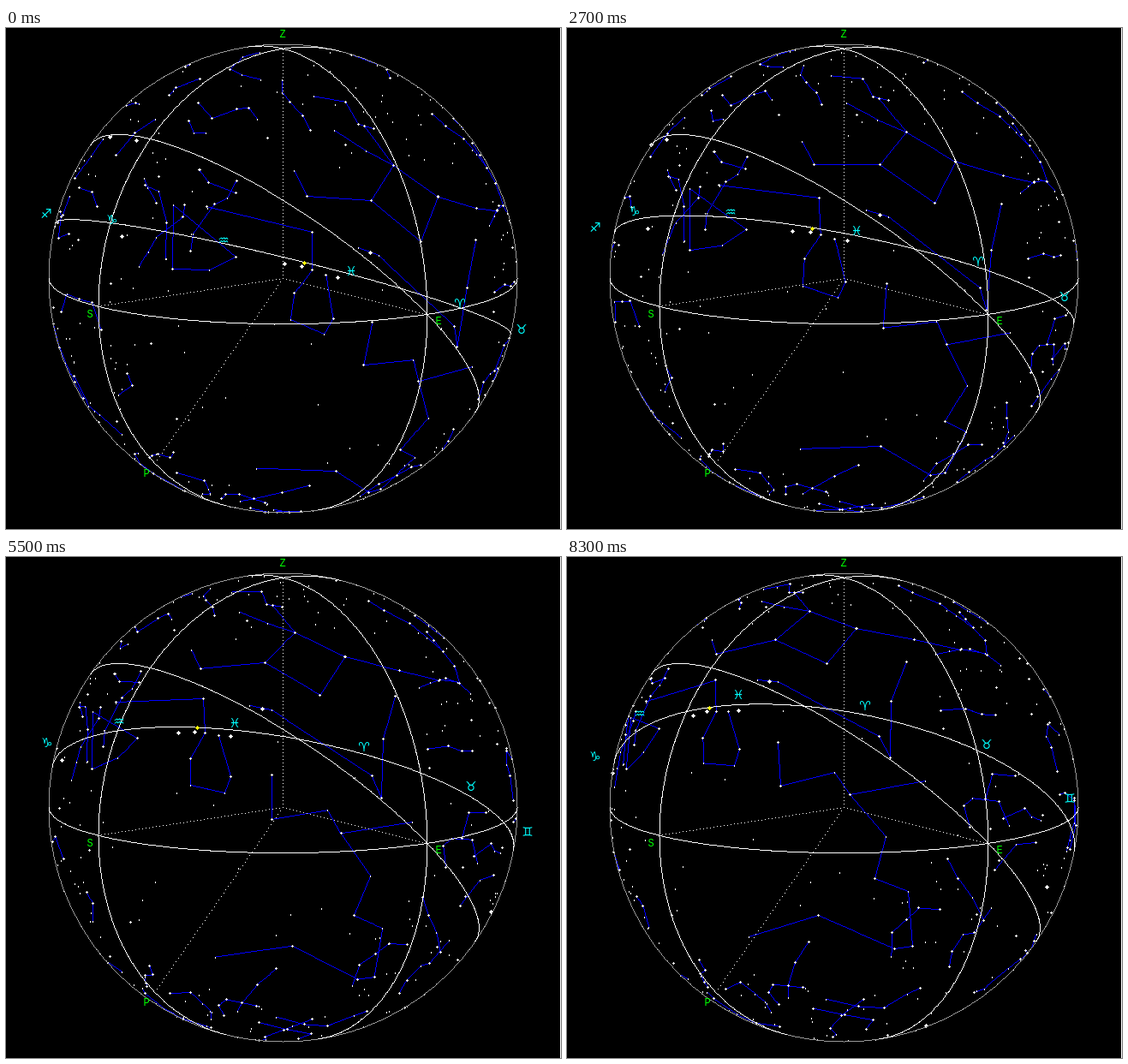
Write an HTML page with a canvas that moves like this. It is 648 by 585 pixels and loops after 8.4 s.

```html
<!DOCTYPE html>
<html lang="en">
<head>
<meta charset="utf-8">
<title>Turning celestial sphere</title>
<style>
html, body { margin: 0; width: 100%; height: 100%; overflow: hidden; background: #000; }
canvas { display: block; }
</style>
</head>
<body>
<canvas id="sky" width="648" height="585"></canvas>
<script>
const ctx = document.getElementById('sky').getContext('2d');
const CX = 323, CY = 292, R = 273.5, RAD = Math.PI / 180;
const STEPS = 84, STEP_MS = 100;
const sin = d => Math.sin(d * RAD), cos = d => Math.cos(d * RAD);
const mix = (u, a, v, b) => u.map((c, i) => c * a + v[i] * b);
const dot = (u, v) => u[0] * v[0] + u[1] * v[1] + u[2] * v[2];

// Vectors are [right, down, towards the viewer].
const TILT = 11.2, AZIMUTH = 52, LATITUDE = 46, OBLIQUITY = 23.5;
const level = (right, near) => [right, near * sin(TILT), near * cos(TILT)];
const south = level(-sin(AZIMUTH), cos(AZIMUTH));
const east = level(cos(AZIMUTH), sin(AZIMUTH));
const zenith = [0, -cos(TILT), sin(TILT)];
const culmination = mix(south, sin(LATITUDE), zenith, cos(LATITUDE));
const north = mix(south, -cos(LATITUDE), zenith, sin(LATITUDE));
const southPole = north.map(c => -c);

const siderealAngle = step => 10.4 + 0.5875 * step;
const screen = (v, scale = 1) => [CX + v[0] * R * scale, CY + v[1] * R * scale];

function direction({ ra, dec }, step) {
  const hour = siderealAngle(step) - ra;
  return mix(mix(east, cos(hour), culmination, sin(hour)), cos(dec), north, sin(dec));
}

function onSphere(x, y, step) {
  const u = (x - CX) / R, v = (y - CY) / R;
  const p = [u, v, Math.sqrt(1 - u * u - v * v)];
  const hour = Math.atan2(dot(p, culmination), dot(p, east)) / RAD;
  return { ra: siderealAngle(step) - hour, dec: Math.asin(dot(p, north)) / RAD };
}

function ecliptic(lon) {
  return {
    ra: Math.atan2(sin(lon) * cos(OBLIQUITY), cos(lon)) / RAD,
    dec: Math.asin(sin(lon) * sin(OBLIQUITY)) / RAD
  };
}

let seed = 1524;
const random = (from = 0, to = 1) => {
  seed = (seed * 1664525 + 1013904223) % 4294967296;
  return from + (to - from) * seed / 4294967296;
};

const stars = [], figures = [];

function addFigure(chain) {
  figures.push(chain);
  for (const star of chain) stars.push({ ...star, size: random() < 0.7 ? 1 : 0 });
}

// The large figures in the middle, by their key points as seen at a step.
function figure(step, ...points) {
  const chain = [];
  for (let i = 0; i < points.length; i += 2) chain.push(onSphere(points[i], points[i + 1], step));
  addFigure(chain);
}
figure(0, 336,166, 351,196, 426,201, 484,249, 504,197, 452,160, 426,201); // winged horse
figure(0, 383,119, 420,143, 452,160, 418,114);
figure(83, 337,83, 405,96, 459,108);
figure(83, 222,143, 246,145, 364,209, 377,234, 378,168, 396,122);         // fishes
figure(0, 195,206, 268,267, 237,282, 194,281, 195,206);                   // sea goat
figure(55, 128,169, 230,165, 232,205, 215,235, 215,266, 255,275, 262,256, 248,208); // water bearer
figure(83, 246,216, 249,267, 312,251, 330,277, 418,261);                  // whale
figure(83, 330,277, 372,326, 359,375, 398,390, 403,454, 382,457, 293,418, 212,443); // river

const sun = onSphere(348, 274, 0);
for (const [ra, dec] of [[-4, -3], [0, -1], [9, 2], [12, 12]])
  stars.push({ ra: sun.ra + ra, dec: sun.dec + dec, size: 2 });

const randomPlace = () => ({ ra: random(0, 360), dec: Math.asin(random(-1, 1)) / RAD });
const nearMiddle = place => direction(place, STEPS / 2)[2] > 0.7;

// Everywhere else: wandering chains and loose stars.
for (let i = 0; i < 110; i++) {
  let place = randomPlace(), heading = random(0, 360);
  const chain = [place];
  for (let n = random(2, 5); n > 1; n--) {
    heading += random(-80, 80);
    const length = random(3, 9);
    place = {
      ra: place.ra + length * cos(heading) / Math.max(0.2, cos(place.dec)),
      dec: place.dec + length * sin(heading)
    };
    chain.push(place);
  }
  if (!chain.some(nearMiddle)) addFigure(chain);
}
for (let i = 0; i < 450; i++) {
  const place = randomPlace(), brightness = random();
  if (!nearMiddle(place) || brightness < 0.25)
    stars.push({ ...place, size: brightness > 0.97 ? 2 : brightness > 0.8 ? 1 : 0 });
}

function line([x0, y0], [x1, y1], color, gap = 1) {
  ctx.fillStyle = color;
  const n = Math.max(1, Math.ceil(Math.max(Math.abs(x1 - x0), Math.abs(y1 - y0))));
  for (let i = 0; i <= n; i += gap)
    ctx.fillRect(Math.round(x0 + (x1 - x0) * i / n), Math.round(y0 + (y1 - y0) * i / n), 1, 1);
}

function arc(from, to, color) {
  if (from[2] > -0.02 && to[2] > -0.02) line(screen(from), screen(to), color);
}

function greatCircle(u, v, color) {
  const at = a => mix(u, cos(a), v, sin(a));
  for (let a = 0; a < 360; a += 2) arc(at(a), at(a + 2), color);
}

function drawStar(v, size, color) {
  if (v[2] < 0) return;
  const [x, y] = screen(v).map(Math.round);
  ctx.fillStyle = color;
  if (size === 0) return ctx.fillRect(x, y, 1, 2);
  ctx.fillRect(x - size, y, 2 * size + 1, 1);
  ctx.fillRect(x, y - size, 1, 2 * size + 1);
  if (size === 2) ctx.fillRect(x - 1, y - 1, 3, 3);
}

const signs = [...'♈♉♊♋♌♍♎♏♐♑♒♓'];
const labels = [['Z', 323, 8], ['S', 98, 335], ['E', 505, 343], ['P', 164, 521]];

function draw(step) {
  ctx.fillStyle = '#000';
  ctx.fillRect(0, 0, 648, 585);
  ctx.fillStyle = '#fff';
  ctx.fillRect(647, 0, 1, 585);

  for (const chain of figures)
    chain.map(star => direction(star, step))
      .forEach((v, i, all) => i && arc(all[i - 1], v, '#00f'));
  for (const star of stars) drawStar(direction(star, step), star.size, '#fff');

  greatCircle([1, 0, 0], [0, 1, 0], '#999');
  greatCircle(south, east, '#fff');
  greatCircle(south, zenith, '#fff');
  greatCircle(east, zenith, '#fff');
  greatCircle(east, culmination, '#fff');
  greatCircle(direction(ecliptic(0), step), direction(ecliptic(90), step), '#fff');
  for (const end of [zenith, south, east, southPole]) line([CX, CY], screen(end), '#fff', 4);
  drawStar(direction(sun, step), 2, '#ff0');

  ctx.textAlign = 'center';
  ctx.textBaseline = 'middle';
  ctx.font = '12px "Liberation Mono", monospace';
  ctx.fillStyle = '#0f0';
  for (const [text, x, y] of labels) ctx.fillText(text, x, y);
  ctx.font = '15px "DejaVu Sans", sans-serif';
  ctx.fillStyle = '#0ff';
  signs.forEach((sign, i) => {
    const v = direction(ecliptic(i * 30 + 15), step);
    if (v[2] > 0) ctx.fillText(sign + '\uFE0E', ...screen(v, 1.08).map(Math.round));
  });
}

let shown = -1;
function tick() {
  const step = Math.floor(performance.now() / STEP_MS) % STEPS;
  if (step !== shown) draw(shown = step);
  requestAnimationFrame(tick);
}
tick();
</script>
</body>
</html>
```
